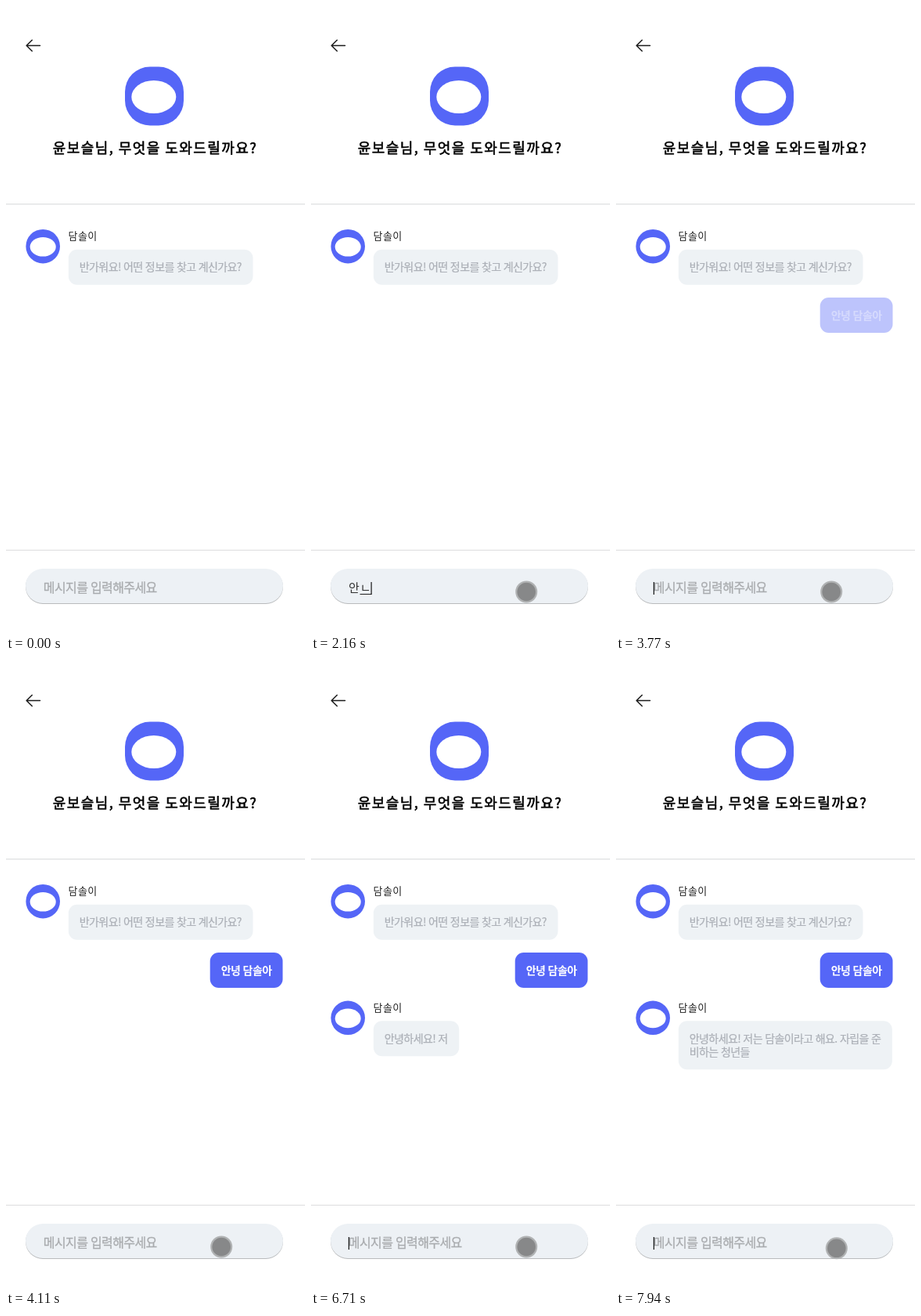
Recreate the animation shown at these times as an HTML page with a canvas. Size 382 by 800 pixels, loop 8 s.

```html
<!DOCTYPE html>
<html lang="ko">
<head>
<meta charset="utf-8">
<title>Chat</title>
<style>
  html, body { margin: 0; width: 100%; height: 100%; overflow: hidden; background: #fff; }
  canvas { display: block; width: 382px; height: 800px; }
</style>
</head>
<body>
<canvas id="stage"></canvas>
<script>
const W = 382, H = 800, LOOP = 8000;
const FAMILY = '"Noto Sans CJK KR", "Noto Sans CJK", sans-serif';
const BLUE = '#5566f7', PALE = '#edf1f5', BUBBLE = '#eef2f5';
const BOT = '담솔이', TYPE_X = 47.8;
const REPLY = [`안녕하세요! 저는 ${BOT}라고 해요. 자립을 준`, '비하는 청년들'];

// heavy: extra outline width for weights between regular and bold
const STYLES = {
  title: { size: 18, weight: 500, gap: 1.45, color: '#000', heavy: 0.6 },
  name: { size: 13, weight: 400, gap: 0.4, color: '#222' },
  bot: { size: 14, weight: 500, gap: -0.6, word: 0.7, color: '#acb0b7', heavy: 0.25 },
  user: { size: 14, weight: 700, gap: -0.58, word: 0.7, color: '#fff' },
  hint: { size: 16, weight: 500, gap: -0.6, word: 0.7, color: '#a9abae', heavy: 0.3 },
  typed: { size: 15, weight: 300, gap: 0.92, color: '#333' }
};

// [time, committed text, syllable being composed]
const KEYS = [
  [1500, '', 'ㅇ'], [1900, '', '아'], [1960, '', '안'],
  [2160, '안', 'ㄴ'], [2230, '안', '녀'], [2300, '안', '녕'], [2420, '안녕 ', ''],
  [2560, '안녕 ', 'ㄷ'], [2630, '안녕 ', '다'], [2760, '안녕 ', '담'],
  [2890, '안녕 담', 'ㅅ'], [3040, '안녕 담', '소'], [3110, '안녕 담', '솔'],
  [3310, '안녕 담솔', 'ㅇ'], [3380, '안녕 담솔', '아']
];
const SENT = 3640, ANSWER = 6310;
const BLINKS = [1180, 4110, 4570, 5100, 5580, 6110, 6610, 7120, 7600];
// [time, characters of the reply shown]
const STREAM = [[6310, 0], [6710, 8], [7050, 15], [7450, 23], [7670, 28], [7940, 32]];

const canvas = document.getElementById('stage');
const ctx = canvas.getContext('2d');
const dpr = window.devicePixelRatio || 1;
canvas.width = W * dpr;
canvas.height = H * dpr;

const clamp = v => Math.max(0, Math.min(1, v));
const progress = (t, from, len) => clamp((t - from) / len);
const mix = (a, b, p) => a + (b - a) * p;

function setFont({ size, weight, gap, word = 0 }) {
  ctx.font = `${weight} ${size}px ${FAMILY}`;
  ctx.letterSpacing = `${gap}px`;
  ctx.wordSpacing = `${word}px`;
}

function text(str, x, y, style) {
  setFont(style);
  ctx.fillStyle = ctx.strokeStyle = style.color;
  ctx.fillText(str, x, y);
  if (style.heavy) {
    ctx.lineWidth = style.heavy;
    ctx.lineJoin = 'round';
    ctx.strokeText(str, x, y);
  }
}

function widthOf(str, style) {
  setFont(style);
  return ctx.measureText(str).width;
}

function box(x, y, w, h, r, color) {
  ctx.fillStyle = color;
  ctx.beginPath();
  ctx.roundRect(x, y, w, h, r);
  ctx.fill();
}

function oval(x, y, rx, ry, color) {
  ctx.fillStyle = color;
  ctx.beginPath();
  ctx.ellipse(x, y, rx, ry, 0, 0, Math.PI * 2);
  ctx.fill();
}

function fade(alpha, draw) {
  ctx.save();
  ctx.globalAlpha = alpha;
  draw();
  ctx.restore();
}

function header() {
  ctx.strokeStyle = '#1a1a1a';
  ctx.lineWidth = 1.5;
  ctx.lineCap = ctx.lineJoin = 'round';
  ctx.beginPath();
  ctx.moveTo(43.5, 50.5);
  ctx.lineTo(26.2, 50.5);
  ctx.moveTo(33.3, 43.5);
  ctx.lineTo(26.2, 50.5);
  ctx.lineTo(33.3, 57.5);
  ctx.stroke();

  box(152, 77.5, 75, 75, 32, BLUE);
  oval(188.8, 116, 28.5, 21, '#fff');
  text('윤보슬님, 무엇을 도와드릴까요?', 59.8, 188, STYLES.title);
  box(0, 252, W, 1.5, 0, '#e3e4e5');
}

function botMessage(y, lines) {
  oval(47.2, y + 21.7, 21.8, 21.8, BLUE);
  oval(47.2, y + 22.3, 16.5, 12.3, '#fff');
  text(BOT, 79.6, y + 13, STYLES.name);
  const w = Math.max(...lines.map(s => widthOf(s, STYLES.bot)));
  box(79.8, y + 25.7, w + 28.6, 28 + 17 * lines.length, 11, BUBBLE);
  lines.forEach((s, i) => text(s, 93.8, y + 53.4 + 17 * i, STYLES.bot));
}

function userMessage(str) {
  const w = widthOf(str, STYLES.user) + 28;
  box(353.5 - w, 372, w, 45, 11, BLUE);
  text(str, 367.5 - w, 400, STYLES.user);
}

function replyLines(t) {
  let n = 0;
  for (let i = 1; i < STREAM.length; i++) {
    const [t0, n0] = STREAM[i - 1], [t1, n1] = STREAM[i];
    if (t >= t0) n = Math.floor(mix(n0, n1, progress(t, t0, t1 - t0)) + 1e-6);
  }
  const first = REPLY[0].length;
  return n > first ? [REPLY[0], REPLY[1].slice(0, n - first)] : [REPLY[0].slice(0, n)];
}

function caretOn(t) {
  return BLINKS.filter(b => t >= b).length % 2 === 1;
}

function inputBar(t) {
  box(0, 693.7, W, 1.3, 0, '#e1e2e3');
  box(25, 719, 329, 44, 22, '#b9bbbd');
  box(25, 718, 329, 44, 22, PALE);

  let caretX = TYPE_X;
  const key = t < SENT && KEYS.filter(k => t >= k[0]).pop();
  if (key) {
    const [, done, draft] = key;
    const start = TYPE_X + widthOf(done, STYLES.typed);
    text(done + draft, TYPE_X + 0.3, 747.6, STYLES.typed);
    caretX = start;
    if (draft) {
      const w = widthOf(draft, STYLES.typed);
      box(start, 750, w, 1, 0, '#222');
      caretX += w - 0.7;
    }
  } else {
    text('메시지를 입력해주세요', TYPE_X, 747.6, STYLES.hint);
  }
  if (caretOn(t)) box(caretX, 735, 1.1, 16, 0, '#000');
}

function pointer(t) {
  if (t < 440) return;
  const enter = 1 - (1 - progress(t, 440, 200)) ** 2;
  const leave = progress(t, 7750, 190) ** 2;
  const x = mix(296, 275.2, enter) + 6.6 * leave;
  const y = mix(769, 747.5, enter) + 1.8 * leave;
  const down = t >= 910 && t < 1180;
  const r = down ? 14.6 : 14;
  oval(x, y, r, r, down ? '#a4a5a6' : '#b0b2b3');
  oval(x, y, 11.8, 11.8, down ? '#747576' : '#878889');
}

function draw(t) {
  ctx.setTransform(dpr, 0, 0, dpr, 0, 0);
  ctx.fillStyle = '#fff';
  ctx.fillRect(0, 0, W, H);
  header();
  botMessage(285, ['반가워요! 어떤 정보를 찾고 계신가요?']);
  if (t >= SENT) fade(progress(t, SENT, 340), () => userMessage('안녕 담솔아'));
  if (t >= ANSWER) fade(progress(t, ANSWER - 60, 260), () => botMessage(433.6, replyLines(t)));
  inputBar(t);
  pointer(t);
}

const begin = performance.now();
function frame() {
  draw((performance.now() - begin) % LOOP);
  requestAnimationFrame(frame);
}
frame();
</script>
</body>
</html>
```
